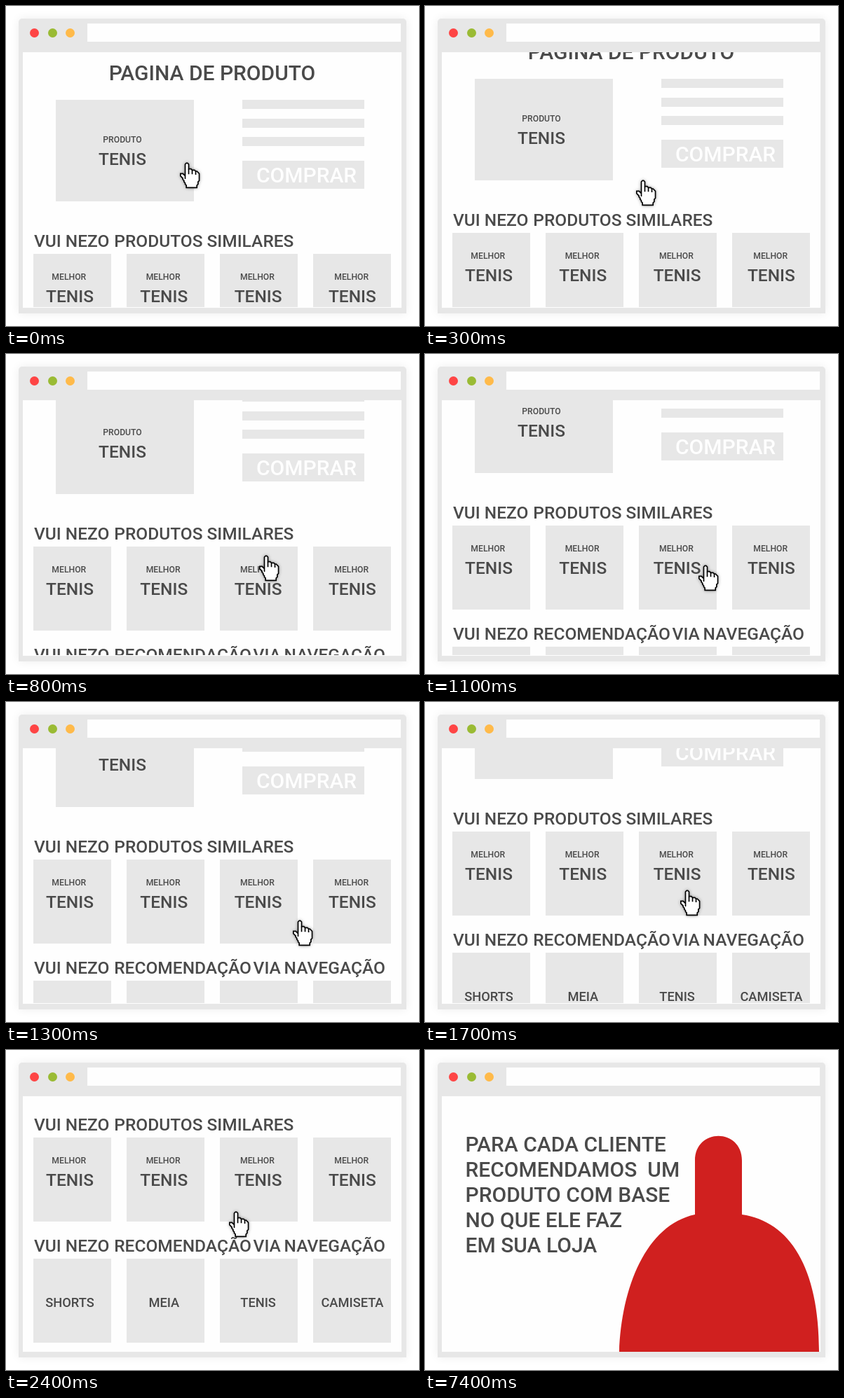
Animation of 589 by 457 pixels, one loop 8 s. Source, as an HTML page with a canvas:

```html
<!DOCTYPE html>
<html lang="pt">
<head>
<meta charset="utf-8">
<title>Recomendações</title>
<style>
html, body { margin: 0; width: 100%; height: 100%; overflow: hidden; background: #fff; }
canvas { display: block; }
</style>
</head>
<body>
<canvas id="stage" width="589" height="457"></canvas>
<script>
const ctx = document.getElementById('stage').getContext('2d');
const GREY = '#e7e7e7', INK = '#4a4a4a', PAPER = '#fefefe';
const LOOP = 8000, STEP = 100, MESSAGE_AT = 7400, LAST_STEP = 23;
const BRAND = 'VUI NEZO';

// Fingertip of the pointer: step, x, y
const POINTER = [
  [0, 258, 224], [3, 311, 249], [8, 371, 288],
  [13, 419, 312], [17, 374, 269], [23, 328, 231]
];

const hand = new Path2D('M4.5 14V1.5L5.5 .5H6.5L7.5 1.5V5.5H9.5L10.5 6.5H12.5L13.5 7.5H14.5' +
  'L16.5 9.5V15.5L15.5 16.5V18.5L14.5 19.5V21.5H5.5V19.5L4.5 18.5V17.5L3.5 16.5V15.5' +
  'L2.5 14.5V13.5L.5 11.5V9.5H2.5L4.5 11.5Z');
const fingers = new Path2D('M7.5 5.5V10M10.5 6.5V10M13.5 7.5V10.5');
const figure = new Path2D('M277 431C280 340 315 250 385 235V158C385 111 452 111 452 158V235' +
  'C520 245 562 310 562 431Z');

function rect(x, y, w, h, color = GREY) {
  ctx.fillStyle = color;
  ctx.fillRect(x, y, w, h);
}

function text(str, x, y, size, align = 'center', color = INK) {
  ctx.font = `500 ${size}px Roboto, sans-serif`;
  ctx.textAlign = align;
  ctx.fillStyle = color;
  ctx.fillText(str, x, y);
}

function drawBrowser() {
  rect(0, 0, 589, 457, '#fff');
  ctx.save();
  ctx.shadowColor = 'rgba(0,0,0,.07)';
  ctx.shadowBlur = 14;
  ctx.fillStyle = GREY;
  ctx.beginPath();
  ctx.roundRect(18, 18, 553, 421, [5, 5, 0, 0]);
  ctx.fill();
  ctx.restore();
  rect(116, 25, 447, 26, PAPER);
  rect(24, 66, 540, 365, PAPER);
  [[40.5, '#fe4545'], [66.5, '#9abb34'], [91.5, '#ffba4a']].forEach(([x, color]) => {
    ctx.fillStyle = color;
    ctx.beginPath();
    ctx.arc(x, 38.5, 6.5, 0, 7);
    ctx.fill();
  });
}

function heading(y, ...parts) {
  [[BRAND, 40], ...parts].forEach(([str, x]) => text(str, x, y, 24.5, 'left'));
}

function drawPage(scroll) {
  ctx.save();
  ctx.beginPath();
  ctx.rect(24, 66, 540, 364);
  ctx.clip();
  ctx.translate(0, -scroll);

  text('PAGINA DE PRODUTO', 294, 106, 30);
  rect(71, 134, 197, 145);
  text('PRODUTO', 166, 195, 12.2);
  text('TENIS', 166, 227, 24.5);
  [134, 161, 187].forEach(y => rect(337, y, 174, 13));
  rect(337, 221, 174, 40);
  text('COMPRAR', 428.5, 252, 30, 'center', PAPER);

  heading(344, ['PRODUTOS SIMILARES', 154.3]);
  heading(517, ['RECOMENDAÇÃO', 154.3], ['VIA', 352.6], ['NAVEGAÇÃO', 396.6]);
  ['SHORTS', 'MEIA', 'TENIS', 'CAMISETA'].forEach((item, i) => {
    const x = 39 + 133 * i, mid = 91 + 134.3 * i;
    rect(x, 354, 111, 120);
    text('MELHOR', mid - 1.2, 391, 12.2);
    text('TENIS', mid, 423, 24.5);
    rect(x, 527, 111, 120);
    text(item, mid, 596, 18.3);
  });
  ctx.restore();
}

function drawPointer(n) {
  const i = Math.max(1, POINTER.findIndex(p => p[0] >= n));
  const [n0, x0, y0] = POINTER[i - 1], [n1, x1, y1] = POINTER[i];
  const k = (n - n0) / (n1 - n0);
  ctx.save();
  ctx.translate(Math.round(x0 + (x1 - x0) * k) - 10, Math.round(y0 + (y1 - y0) * k) - 0.5);
  ctx.scale(1.67, 1.67);
  ctx.lineWidth = 1;
  ctx.strokeStyle = '#000';
  ctx.fillStyle = '#fff';
  ctx.shadowColor = 'rgba(0,0,0,.6)';
  ctx.shadowBlur = 5;
  ctx.fill(hand);
  ctx.shadowColor = 'transparent';
  ctx.stroke(hand);
  ctx.stroke(fingers);
  ctx.restore();
}

function drawMessage() {
  ['PARA CADA CLIENTE', 'RECOMENDAMOS  UM', 'PRODUTO COM BASE', 'NO QUE ELE FAZ', 'EM SUA LOJA']
    .forEach((line, i) => text(line, 57.5, 145 + 36 * i, 30, 'left'));
  ctx.fillStyle = '#d0201f';
  ctx.fill(figure);
}

function render(t) {
  drawBrowser();
  if (t >= MESSAGE_AT) return drawMessage();
  // The scroll rests for one step at two seconds
  const tick = Math.floor(t / STEP);
  const n = Math.min(LAST_STEP, tick < 20 ? tick : tick - 1);
  drawPage(10 * n - (n > 5 ? 1 : 0));
  drawPointer(n);
}

const start = performance.now();
function loop() {
  render((performance.now() - start) % LOOP);
  requestAnimationFrame(loop);
}
loop();
</script>
</body>
</html>
```
